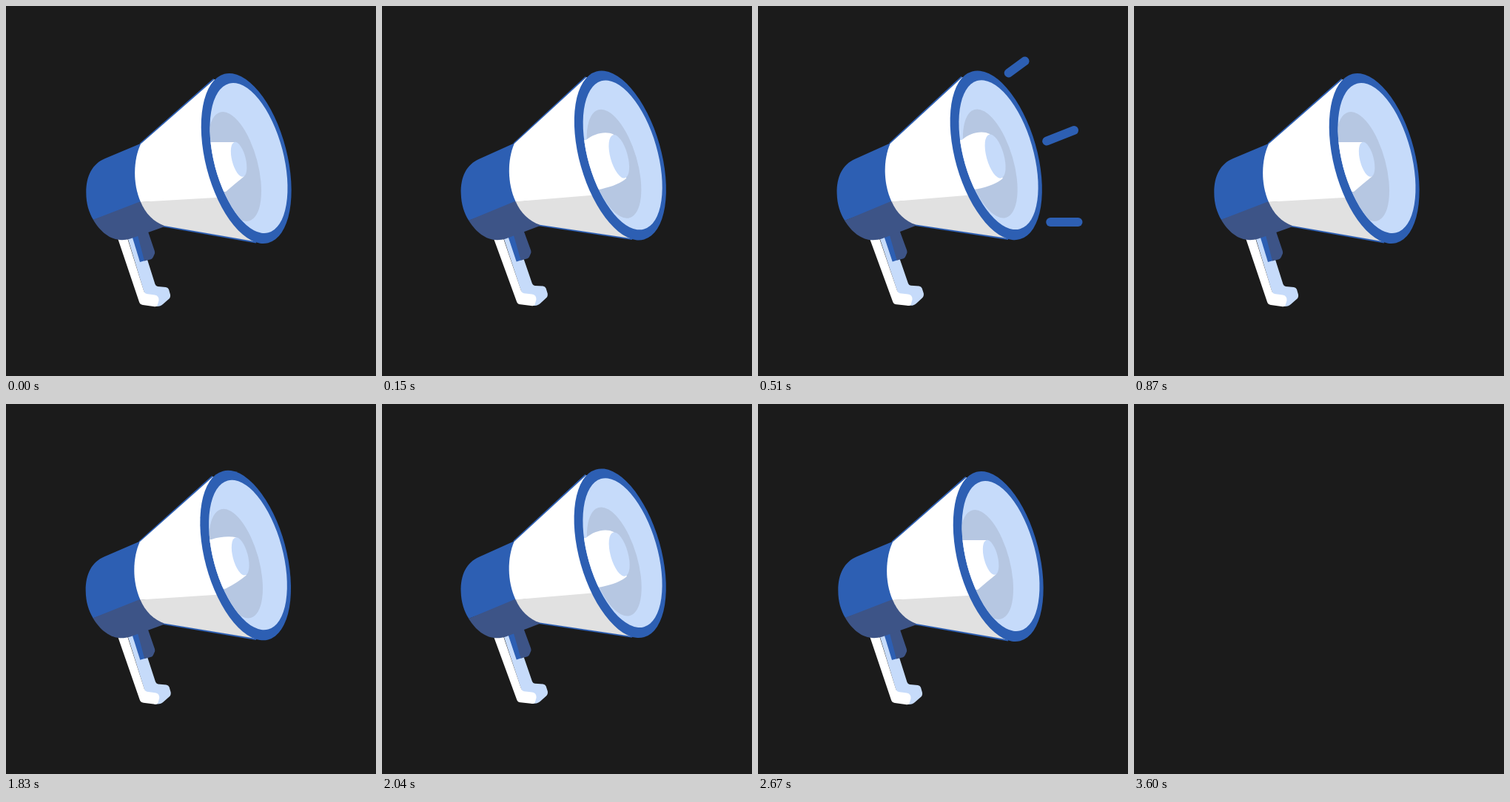
These frames come from a looping animation (500x500 px, 3.63 s). An HTML page:

```html
<!DOCTYPE html>
<html lang="en">
<head>
<meta charset="utf-8">
<title>Megaphone</title>
<style>
  html, body { margin: 0; width: 100%; height: 100%; overflow: hidden; background: #1b1b1b; }
  svg { display: block; width: 100%; height: 100%; }
  .blue { fill: #2d5fb3; }
  .navy { fill: #3d5487; }
  .pale { fill: #c6dbfa; }
  .shade { fill: #b6c7e2; }
  .white { fill: #fff; }
  .grey { fill: #e1e1e1; }
  .edge { stroke: #2d5fb3; stroke-width: 2.4; fill: none; }
  .ray { stroke: #2d5fb3; stroke-width: 12; stroke-linecap: round; }
</style>
</head>
<body>
<svg viewBox="0 0 500 500">
  <defs>
    <clipPath id="mouth">
      <ellipse rx="46.9" ry="104.2" transform="translate(328 205.5) rotate(-14.7)"/>
    </clipPath>
  </defs>
  <g id="rays"></g>
  <g id="horn">
    <!-- handle -->
    <path class="pale" d="M164 312L187 388L200 406H204Q209 406 212 403L220 396Q222.500 394 222 390L220 383Q219 380.500 216 380L205 379Q202.500 378.500 201.500 376L180 308Z"/>
    <path class="white" d="M151 314L180 400Q181 403.500 185 404L201 406.200Q204 406.500 205 403L206.500 398Q207 391.500 201 390.500L190 389Q187.500 388.500 186.500 386L163.500 312Z"/>
    <!-- trigger -->
    <path class="blue" d="M170 310L181 346L188 344L178 306Z"/>
    <path class="navy" d="M177 306L187 344.500L196 342.200Q198 341.500 199 339L201 334.500Q201.300 333 200.800 331L191 302Z"/>
    <!-- body -->
    <path class="blue" d="M184 185L134 206C117 213 108.300 229 108.300 252C108.300 267 112 279 118 289L184 266L196 230Z"/>
    <path class="navy" d="M117.800 288.800L182 264L216 297.500L168 314.500C146 321 129 308 117.800 288.800Z"/>
    <!-- cone -->
    <path class="edge" d="M181.500 186.500L281 99M213 297.300L338 319.300"/>
    <path class="white" d="M182 186.500L282 99L322 200L290 262L182 265C171 240 172 208 182 186.500Z"/>
    <path class="grey" d="M182 264.700L300 258L338 318.600L214 297C200 292 188 280 182 264.700Z"/>
    <!-- mouth -->
    <ellipse class="blue" rx="55.1" ry="117.900" transform="translate(324.700 206) rotate(-14.5)"/>
    <ellipse class="pale" rx="46.9" ry="104.2" transform="translate(328 205.5) rotate(-14.7)"/>
    <g clip-path="url(#mouth)">
      <ellipse id="ring" class="shade" rx="31.4" ry="76"/>
      <path id="bell" class="white"/>
      <ellipse id="tip" class="pale" rx="9.3" ry="24.1"/>
    </g>
  </g>
</svg>
<script>
const LOOP = 3630, CYCLE = 1800, END = 3600, STEP = 30;
const $ = id => document.getElementById(id);
const mix = (a, b, k) => a + (b - a) * k;
const span = (t, a, b) => Math.min(1, Math.max(0, (t - a) / (b - a)));

// Symmetric cubic-bezier(h, 0, 1 - h, 1), solved by bisection
function ease(p, h) {
  let lo = 0, hi = 1;
  for (let i = 0; i < 30; i++) {
    const s = (lo + hi) / 2;
    const x = 3 * h * s * (1 - s) ** 2 + 3 * (1 - h) * s * s * (1 - s) + s ** 3;
    if (x < p) lo = s; else hi = s;
  }
  return lo * lo * (3 - 2 * lo);
}

const rays = [
  [338, 91, 383, 58],
  [389, 183, 465, 153],
  [394, 292, 471, 292]
].map(pts => {
  const el = document.createElementNS("http://www.w3.org/2000/svg", "line");
  el.setAttribute("class", "ray");
  $("rays").append(el);
  return { el, pts };
});

// Points of the inner bell: at rest and pushed out
const bellRest = [289, 184, 300, 184, 310, 184, 321.5, 230.5, 309, 240.5];
const bellOut = [290, 175, 306, 171, 317, 177, 333, 237.5, 323, 246.5];

function drawHorn(k) {
  $("horn").setAttribute("transform", `rotate(${-1.5 * k} 160 318)`);
  $("ring").setAttribute("transform", `translate(${309 + 7.5 * k} 217) rotate(-14.8)`);
  $("tip").setAttribute("transform",
    `translate(${314.6 + 9 * k} 207.3) rotate(-14.1) scale(${1 + 0.27 * k})`);
  const [a, b, c, d, e, f, g, h, i, j] = bellRest.map((v, n) => mix(v, bellOut[n], k));
  $("bell").setAttribute("d",
    `M255 184H279C${a} ${b} ${c} ${d} ${e} ${f}L${g} ${h}Q${i} ${j} 297 251H255Z`);
}

function drawRays(t) {
  const head = ease(span(t, 270, 750), 0.72);
  const tail = ease(span(t, 450, 870), 0.72);
  $("rays").style.display = t >= 300 && t < 870 ? "" : "none";
  for (const { el, pts: [x1, y1, x2, y2] } of rays) {
    el.setAttribute("x1", mix(x1, x2, tail));
    el.setAttribute("y1", mix(y1, y2, tail));
    el.setAttribute("x2", mix(x1, x2, head) + 0.01);
    el.setAttribute("y2", mix(y1, y2, head));
  }
}

function draw(now) {
  const time = Math.floor((now % LOOP) / STEP) * STEP;
  const t = time % CYCLE;
  const push = 1 - (1 - span(t, 0, 300)) ** 4;
  const back = ease(span(t, 480, 870), 0.4);
  $("horn").style.display = time < END ? "" : "none";
  drawHorn(push * (1 - back));
  drawRays(t);
}

const start = performance.now();
function tick() {
  draw(performance.now() - start);
  requestAnimationFrame(tick);
}
tick();
</script>
</body>
</html>
```
